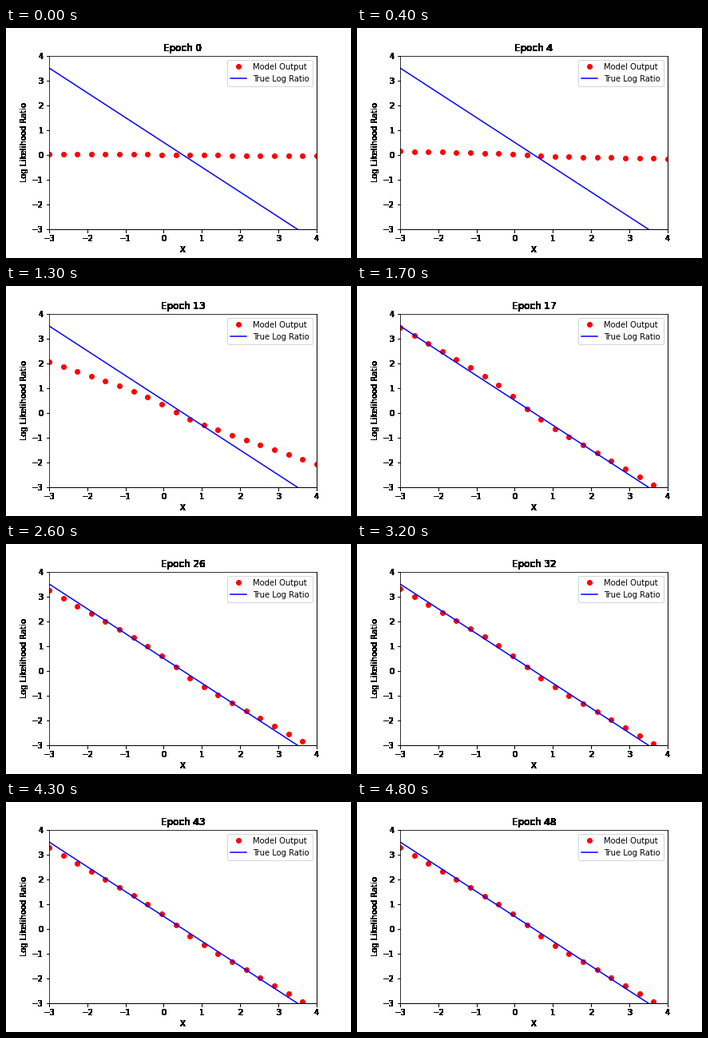
Animation of 432 by 288 pixels, one loop 4.9 s. Source, as a matplotlib script:

```python
import numpy as np
import matplotlib.pyplot as plt
from matplotlib.animation import FuncAnimation

plt.rcParams["font.family"] = "DejaVu Sans"

EPOCHS = 49
X = np.linspace(-3, 4, 20)
MID = X[9]


def bump(epoch, center, width):
    return np.exp(-((epoch - center) / width) ** 2)


def model_output(epoch):
    """A falling line with a soft kink: logistic growth, overshoot, settling."""
    grown = 1 / (1 + np.exp(-0.41 * (epoch - 11.94)))
    grown += 0.12 * bump(epoch, 17.7, 2.2) - 0.035 * bump(epoch, 24, 4)
    settled = 1 - np.exp(-max(0, epoch - 17) / 13)

    slope = 0.87 * grown
    offset = 0.27 * grown ** 2 - 0.12 * settled
    kink = 0.29 * grown ** 0.6 - 0.08 * settled
    center = 0.1 + 0.2 * settled
    return offset - slope * (X - MID) - kink * np.tanh((X - center) / 0.6)


def harden(img, dpi):
    """Turn every touched pixel solid black."""
    out = np.zeros_like(img)
    out[..., 3] = img[..., 3] > 0
    return out, 0, 0


fig, ax = plt.subplots(figsize=(6, 4), dpi=72, facecolor="white")
fig.subplots_adjust(left=0.125, right=0.9, bottom=0.125, top=0.88)

dots, = ax.plot(X, model_output(0), "ro", label="Model Output")
ax.plot(X, 0.5 - X, "b-", label="True Log Ratio")
ax.set(xlim=(-3, 4), ylim=(-3, 4), xlabel="X", ylabel="Log Likelihood Ratio")
title = ax.set_title("Epoch 0")
ax.legend(loc="upper right")

for part in (ax.xaxis, ax.yaxis, title, ax.spines["right"], ax.spines["bottom"]):
    part.set_agg_filter(harden)


def update(epoch):
    dots.set_ydata(model_output(epoch))
    title.set_text(f"Epoch {epoch}")
    return dots, title


anim = FuncAnimation(fig, update, frames=EPOCHS, interval=100,
                     repeat=True, repeat_delay=0, blit=False)
plt.show()
```
